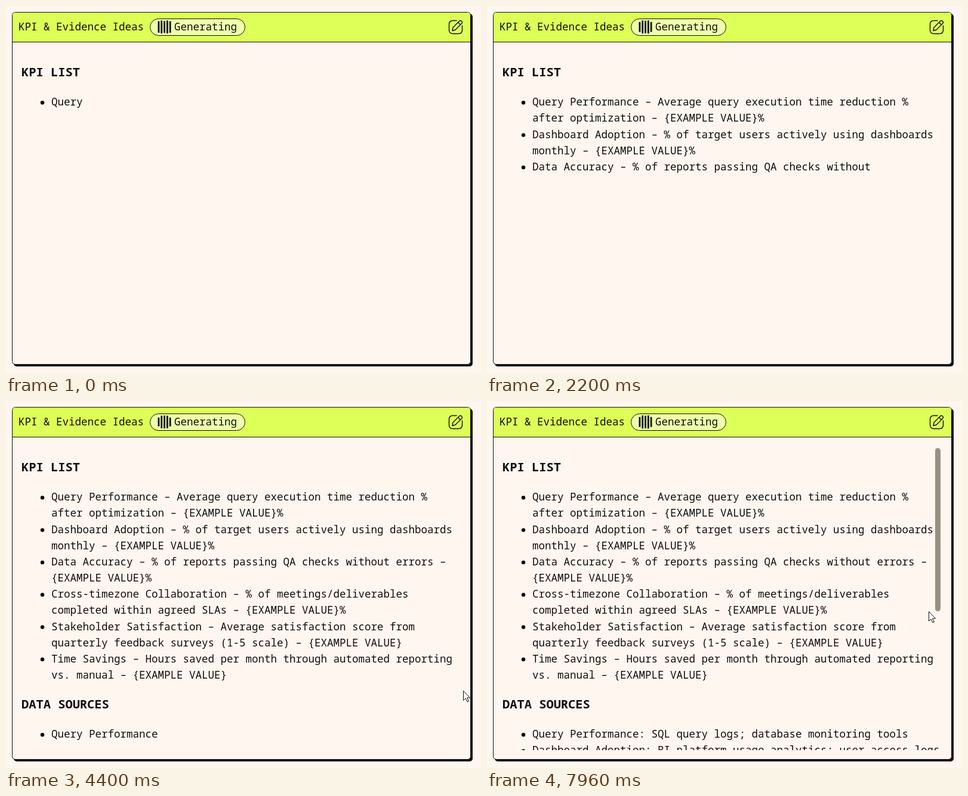
An HTML page that plays this animation: 796 by 616 pixels, repeating every 8000 ms.

```html
<!DOCTYPE html>
<html lang="en">
<head>
<meta charset="utf-8">
<title>KPI &amp; Evidence Ideas</title>
<style>
  html, body { margin: 0; width: 100%; height: 100%; overflow: hidden; background: #fff6ef; }
  svg { display: block; }
  text { font: 17.5px "Noto Sans Mono", monospace; fill: #0f0f0f; white-space: pre; }
  .label { font-weight: 500; }
  .heading { font-size: 20.4px; font-weight: 700; }
  .line { fill: none; stroke: #0f0f0f; stroke-width: 1.4; stroke-linecap: round; stroke-linejoin: round; }
</style>
</head>
<body>
<svg width="796" height="616" viewBox="0 0 796 616">
  <clipPath id="view"><rect x="11" y="61" width="767" height="525"/></clipPath>

  <rect x="13" y="13" width="769" height="592" rx="5" fill="#0f0f0f"/>
  <rect x="10.5" y="10.5" width="768" height="591" rx="5" fill="#fff6ef" stroke="#0f0f0f"/>
  <path d="M11 60V15.500a4.500 4.500 0 0 1 4.500-4.500h758a4.500 4.500 0 0 1 4.500 4.500V60z" fill="#ddff57"/>
  <path d="M11 60.500H778" stroke="#0f0f0f"/>
  <text class="label" x="21" y="41">KPI &amp; Evidence Ideas</text>

  <rect x="241.500" y="21.500" width="159" height="28" rx="14" fill="#eeffab" stroke="#0f0f0f"/>
  <g id="bars" fill="#0f0f0f"></g>
  <text class="label" x="282" y="41">Generating</text>

  <path class="line" d="M755 24.500h-6q-6.500 0-6.500 6.500v9q0 6.500 6.500 6.500h9q6.500 0 6.500-6.500v-7"/>
  <path class="line" d="M748 41.500l1-5.500 10.500-10.500q2-2 4 0t0 4L753 40zM757.500 27.500l4 4"/>

  <g id="content" clip-path="url(#view)"></g>
  <rect id="scrollbar" x="751" y="79" width="9" height="274" rx="4.500" fill="#969182"/>
  <path id="cursor" d="M.5 .5V16.500L4.200 13 7 19 9.400 18 6.700 12H11.500z" fill="#fff" stroke="#0f0f0f"/>
</svg>

<script>
const LOOP = 8000, LINE_HEIGHT = 27.15;
const svg = (parent, tag, attrs) => {
  const node = document.createElementNS(parent.namespaceURI, tag);
  for (const key in attrs) node.setAttribute(key, attrs[key]);
  return parent.appendChild(node);
};
const byId = id => document.getElementById(id);

// "#" starts a heading, "*" a list item; other lines continue an item.
const source = `#KPI LIST
*Query Performance – Average query execution time reduction %
after optimization – {EXAMPLE VALUE}%
*Dashboard Adoption – % of target users actively using dashboards
monthly – {EXAMPLE VALUE}%
*Data Accuracy – % of reports passing QA checks without errors –
{EXAMPLE VALUE}%
*Cross-timezone Collaboration – % of meetings/deliverables
completed within agreed SLAs – {EXAMPLE VALUE}%
*Stakeholder Satisfaction – Average satisfaction score from
quarterly feedback surveys (1-5 scale) – {EXAMPLE VALUE}
*Time Savings – Hours saved per month through automated reporting
vs. manual – {EXAMPLE VALUE}
#DATA SOURCES
*Query Performance: SQL query logs; database monitoring tools
*Dashboard Adoption: BI platform usage analytics; user access logs`;

let offset = 0, baseline = 0, headingCount = 0;
const lines = source.split("\n").map(raw => {
  const heading = raw[0] === "#", item = raw[0] === "*";
  const words = heading || item ? raw.slice(1) : raw;
  if (heading) baseline = headingCount++ ? 516 : 118;
  const line = { words, start: offset };
  line.text = svg(byId("content"), "text",
    { x: heading ? 26 : 76, y: baseline, class: heading ? "heading" : "" });
  if (item) line.bullet = svg(byId("content"), "circle", { cx: 61, cy: baseline - 5, r: 3.2 });
  baseline += heading ? 49.3 : LINE_HEIGHT;
  offset += words.length + 1;
  return line;
});

// Text appears token by token, at a pace set by a few milestones.
const stream = lines.map(line => line.words).join("\n");
const tokenEnds = [...stream.matchAll(/\s?\w+|[^\w\s]+|\s/g)].map(m => m.index + m[0].length);
const endOf = phrase => stream.indexOf(phrase) + phrase.length;
const pace = [
  [0, endOf("Query")],
  [1360, endOf("users actively")],
  [3000, endOf("completed within")],
  [3640, endOf("(1-5")],
  [4400, endOf("DATA SOURCES\nQuery Performance")],
  [4980, stream.length]
];

const pointer = [
  [3080, 797, 508], [3360, 772, 490], [3640, 767, 485], [4400, 766, 486],
  [5920, 766, 486], [6240, 772, 455], [6480, 766, 433], [6900, 773, 420],
  [7560, 771, 385], [7960, 740, 353]
];

function track(points, time) {
  let i = points.findLastIndex(p => p[0] <= time);
  i = Math.max(0, Math.min(i, points.length - 2));
  const [a, b] = [points[i], points[i + 1]];
  const k = Math.max(0, Math.min(1, (time - a[0]) / (b[0] - a[0])));
  return a.slice(1).map((v, n) => v + (b[n + 1] - v) * k);
}

const bars = [0, 100, 200, 100, 0].map((delay, i) => ({
  delay, rect: svg(byId("bars"), "rect", { x: 254.5 + i * 4.8, width: 2.8 })
}));
const easeOut = u => 1 - (1 - u) ** 2.75;

function barHeight(time, delay) {
  const u = ((time + 330 - delay + 720) % 720) / 300;
  const swell = u < 1 ? easeOut(u) : u < 2 ? 1 - easeOut(u - 1) : 0;
  return 12 + 10 * swell;
}

function draw() {
  const time = performance.now() % LOOP;

  const reached = track(pace, time)[0] + 0.5;
  const shown = tokenEnds.findLast(end => end <= reached);
  for (const { words, start, text, bullet } of lines) {
    const visible = words.slice(0, Math.max(0, shown - start));
    if (text.textContent !== visible) text.textContent = visible;
    if (bullet) bullet.style.display = visible ? "" : "none";
  }

  for (const { delay, rect } of bars) {
    const height = barHeight(time, delay);
    rect.setAttribute("y", 35.2 - height / 2);
    rect.setAttribute("height", height);
  }

  const [x, y] = track(pointer, time);
  byId("cursor").setAttribute("transform", `translate(${x} ${y})`);
  byId("cursor").style.display = time < pointer[0][0] ? "none" : "";
  byId("scrollbar").style.display = time < 7700 ? "none" : "";

  requestAnimationFrame(draw);
}
draw();
</script>
</body>
</html>
```
